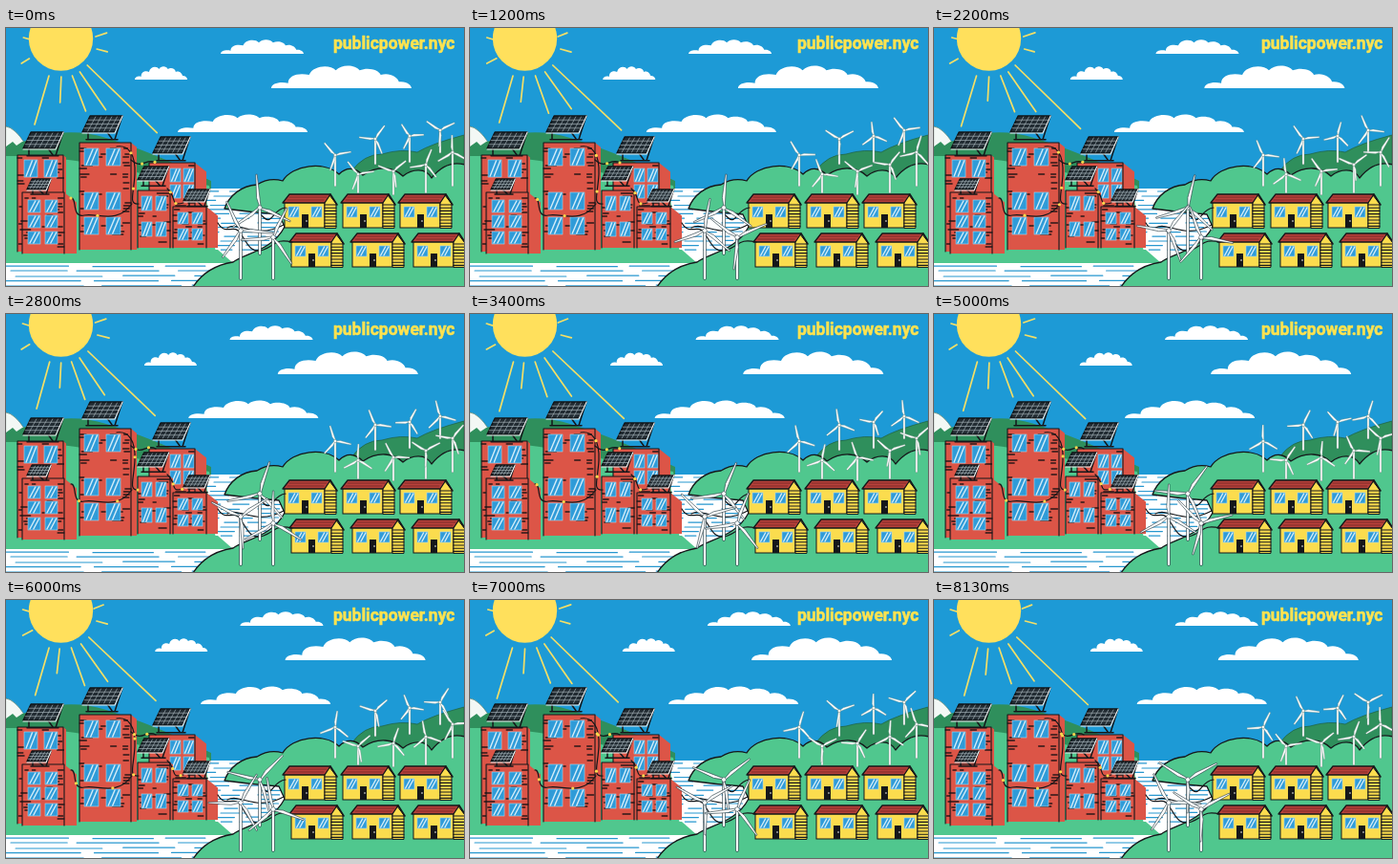
These frames come from a looping animation (480 by 270 pixels, 8.19 s). An HTML page:

```html
<!DOCTYPE html>
<html lang="en">
<head>
<meta charset="utf-8">
<title>Public power</title>
<style>
html, body { margin: 0; width: 100%; height: 100%; overflow: hidden; background: #1d9ad6; }
svg { display: block; width: 100vw; height: 100vh; }
text { font: 700 17.5px Roboto, Arial, sans-serif; }
</style>
</head>
<body>
<svg id="stage" viewBox="0 0 480 270"></svg>
<script>
const LOOP = 8190, STEP = LOOP / 123;
const C = { sky: '#1d9ad6', sun: '#ffe05c', red: '#dc5547', green: '#50c78e', dark: '#2f8f5c',
  ink: '#15171a', house: '#fbdc4e', roof: '#b8403a', water: '#2797cf', glass: '#2f9bd8' };
const stage = document.getElementById('stage');

let seed = 7;
const rnd = (lo, hi) => lo + (hi - lo) * ((seed = (seed * 16807) % 2147483647) / 2147483647);

const path = (d, fill = 'none', stroke = 'none', width = 1) =>
  `<path d="${d}" fill="${fill}" stroke="${stroke}" stroke-width="${width}" stroke-linecap="round" stroke-linejoin="round"/>`;
const rect = (x, y, w, h, fill, extra = '') =>
  `<rect x="${x}" y="${y}" width="${w}" height="${h}" fill="${fill}" ${extra}/>`;

function cloud({ x, y, w, h }) {
  const d = 'M0 1C0 .8 .06 .7 .12 .78C.12 .42 .2 .32 .27 .42C.3 0 .42 -.04 .46 .22' +
    'C.5 -.06 .6 -.03 .63 .22C.69 .06 .77 .2 .78 .42C.84 .3 .9 .5 .91 .72C.97 .68 1 .88 1 1Z';
  return `<g class="cloud"><g transform="translate(${x} ${y}) scale(${w} ${h})">${path(d, '#fff')}</g></g>`;
}

function pane(x, y, w, h) {
  const glint = (from, to) => `M${x + w * from} ${y + h - 1}L${x + w * to} ${y + 1}`;
  return rect(x, y, w, h, C.glass, 'stroke="#a9d9f0" stroke-width=".6"') +
    path(glint(.15, .6) + glint(.45, .9), 'none', '#d3ecf8', 1.4);
}

// The right-hand wall recedes, so its top slopes down
function building(x, y, w, h, { cols, rows, size, side = 3, bricks = 22 }) {
  const right = x + w, front = w - side;
  let out = rect(x, y, front, h, C.red) +
    path(`M${right - side} ${y}L${right} ${y + side * .8}V${y + h}H${right - side}Z`, C.red);
  let marks = '';
  for (let i = 0; i < bricks; i++) {
    const edge = i % 3;
    const bx = edge === 0 ? x + rnd(0, 3) : edge === 1 ? x + front - rnd(6, 9) : x + rnd(3, front - 8);
    marks += `M${bx.toFixed(1)} ${(y + Math.round(rnd(2, h - 4) / 3) * 3).toFixed(1)}h${rnd(3, 7).toFixed(1)}`;
  }
  out += path(marks, 'none', '#2b1718', 1.5);
  for (const wy of rows) for (const wx of cols) out += pane(wx, wy, ...size);
  return out + path(`M${x} ${y + h}V${y}H${right - side}V${y + h}`, 'none', C.ink, 1.1);
}

// x, y: lower left corner of the slanted panel
function panel(x, y, w, h) {
  const lean = h * .48;
  const right = x + w;
  let out = path(`M${right + lean - 1} ${y - h + 2}L${right} ${y + h * .45}M${x + 6} ${y}v${h * .42}` +
    `M${x + 4} ${y + h * .45}H${right + 3}M${right - 8} ${y}l5 ${h * .4}`, 'none', C.ink, 1.5);
  out += path(`M${x} ${y}L${x + lean} ${y - h}H${right + lean}L${right} ${y}Z`, '#222c33', '#101316', 1.5);
  let grid = '';
  for (let i = 1; i < 6; i++) grid += `M${x + w * i / 6} ${y - 1}l${lean} ${-h + 2}`;
  for (let i = 1; i < 4; i++) grid += `M${x + lean * i / 4} ${y - h * i / 4}h${w}`;
  return out + path(grid, 'none', '#a9b6bd', .65) +
    path(`M${x} ${y + 1}H${right}L${right + lean} ${y - h}`, 'none', '#eef3f4', 1.1);
}

function home(x, y) {
  let boards = '';
  for (let i = 0; i < 8; i++) boards += `M43 ${11 + i * 3.2}h12`;
  return `<g transform="translate(${x} ${y})">` +
    rect(1, 8, 42, 27, C.house, `stroke="${C.ink}"`) +
    path('M43 35V8L48 1L55 10V35Z', C.house, C.ink, 1) + path(boards, 'none', C.ink, 1.1) +
    path('M-1 9L6 0H49L43 9Z', C.roof, C.ink, 1.3) +
    path('M4 6H42M6 3H45', 'none', '#6d2524', .8) + path('M49 0L56 11', 'none', C.ink, 1.6) +
    pane(5, 13, 11, 11) + pane(29, 13, 11, 11) +
    rect(19, 21, 7, 14, C.ink) + `<circle cx="24" cy="28" r=".8" fill="#fff"/></g>`;
}

// angle in degrees from upright at the start, speed in degrees per second
const turbine = (x, y, foot, length, angle, speed) => ({ x, y, foot, length, angle, speed });
const farTurbines = [
  turbine(345, 133, 165, 17, -42, 8.2), turbine(387, 116, 142, 17, 35, 22),
  turbine(423, 113, 140, 15, -35, 22), turbine(455, 107, 130, 17, -57, 14.65),
  turbine(369, 153, 172, 17, -40, 14.65), turbine(406, 150, 174, 17, 50, 14.65),
  turbine(440, 143, 172, 17, 20, 14.65), turbine(468, 130, 165, 18, -2, 14.65)
];
const nearTurbines = [
  turbine(266, 188, 236, 35, -6, 8.2), turbine(246, 212, 262, 34, 214, 240 / 8.19),
  turbine(280, 219, 262, 34, 25, 34)
];

function drawTurbine({ x, y, foot, length }) {
  const near = length > 20;
  const wide = near ? 2.3 : 1.5;
  const blade = `M0 0L${-wide} ${-length * .3}L-.6 ${-length}L.8 ${-length}L${wide * .5} 0Z`;
  const edge = near ? '#2c4048' : '#6d8a80';
  const blades = [0, 120, 240].map(a =>
    `<g transform="rotate(${a})">${path(blade, '#fff', edge, near ? .6 : .35)}</g>`).join('');
  return path(`M${x} ${y}V${foot}`, 'none', edge, near ? 3.4 : 2.4) +
    path(`M${x} ${y}V${foot}`, 'none', '#fff', near ? 2.2 : 1.6) +
    `<g class="rotor">${blades}<circle r="${near ? 2.3 : 1.5}" fill="#fff" stroke="${edge}" stroke-width=".5"/></g>`;
}

function ripples(x0, x1, y0, y1, gap) {
  let d = '';
  for (let y = y0; y < y1; y += gap) {
    for (let x = x0 + rnd(-20, 15); x < x1;) {
      const w = rnd(.12, .4) * (x1 - x0);
      d += `M${x.toFixed(1)} ${(y + rnd(-.5, .5)).toFixed(1)}h${w.toFixed(1)}`;
      x += w + rnd(8, 26);
    }
  }
  return path(d, 'none', C.water, 1.2);
}

const clouds = [
  { x: 225, y: 12, w: 87, h: 15, drift: 28 }, { x: 135, y: 40, w: 55, h: 14, drift: 29 },
  { x: 278, y: 39, w: 147, h: 24, drift: 20 }, { x: 180, y: 90, w: 136, h: 19, drift: 33 }
];
// start x, y, end x, y
const rays = [
  [45, 50, 30, 101], [57, 51, 55, 77], [69, 50, 83, 88], [78, 46, 106, 86], [86, 39, 157, 107],
  [95, 22, 106, 25], [93, 9, 104, 5], [18, 10, 25, 12], [17, 37, 26, 32]
];
const wires = [
  'M68 178C75 177 68 199 82 196S116 206 132 184',
  'M116 124C128 122 136 132 135 153S128 185 139 184',
  'M131 138C143 149 147 135 157 141',
  'M169 168C180 178 171 187 186 183'
];

const rightLand = 'M196 271C205 257 219 248 238 245C252 235 279 233 292 208L286 195Q258 193 229 189' +
  'C234 175 247 165 263 164Q276 156 290 160C300 143 334 139 349 153C357 145 366 146 374 154' +
  'C390 143 407 146 416 155C426 147 440 146 446 157C458 142 470 140 481 143V271Z';

stage.innerHTML =
  rect(0, 0, 480, 270, C.sky) +
  '<g id="rays"></g>' +
  `<circle cx="57.5" cy="11" r="33.7" fill="${C.sun}"/>` +
  clouds.map(cloud).join('') +
  path('M0 103Q9 104 20 121L30 142H0Z', '#f3f8f5', '#3b6c58', .6) +
  path('M0 124L7 119L11 123L17 119L36 114Q70 104 105 115T170 139L215 160V190H0Z', C.dark) +
  path('M0 134Q45 133 90 142T213 165L222 232V247H0Z', C.green) +
  path('M208 168H300V246H222Z', '#fff') + ripples(214, 290, 171, 236, 4.7) +
  rect(0, 246, 240, 24, '#fff') + ripples(0, 228, 249.5, 270, 5) +
  path('M0 232H222L238 246H0Z', C.green) +
  path('M362 150Q375 132 394 132Q414 126 431 130Q446 121 480 112V175H362Z', C.dark, '#1f6041', .7) +
  path(rightLand, C.green, C.ink, 1.3) +
  building(150, 141, 60, 60, { cols: [172, 186], rows: [147, 164], size: [11, 14], side: 12 }) +
  building(12, 133, 51, 101, { cols: [19, 40], rows: [138], size: [14, 18], bricks: 30 }) +
  building(17, 172, 57, 64, { cols: [23, 41], rows: [180, 196, 213], size: [13, 13], side: 13, bricks: 26 }) +
  building(77, 120, 60, 112, { cols: [82, 105], rows: [126, 172, 198], size: [15, 18], side: 6, bricks: 54 }) +
  building(138, 170, 37, 60, { cols: [142, 157], rows: [176, 203], size: [11, 15] }) +
  building(175, 187, 47, 43, { cols: [180, 195], rows: [193, 210], size: [11, 12], side: 12 }) +
  panel(18, 126, 34, 17) + panel(80, 109, 34, 17) + panel(154, 131, 31, 17) +
  panel(138, 159, 26, 14) + panel(186, 181, 22, 12) + panel(22, 169, 20, 11) +
  wires.map(d => path(d, 'none', C.ink, 1.2)).join('') +
  '<g id="sparks"></g>' +
  farTurbines.map(drawTurbine).join('') +
  [[291, 174], [352, 174], [412, 174], [298, 215], [362, 215], [426, 215]].map(p => home(...p)).join('') +
  path('M222 204C230 218 239 204 246 215S257 237 270 232S282 220 300 224M232 209C246 202 261 222 291 206' +
    'M266 194C280 211 277 190 293 188', 'none', C.ink, 1.2) +
  nearTurbines.map(drawTurbine).join('') +
  `<text x="470.5" y="22" text-anchor="end" fill="#ffe34f" stroke="#ffe34f" stroke-width=".5">publicpower.nyc</text>`;

const cloudNodes = [...stage.querySelectorAll('.cloud')];
const rotors = [...stage.querySelectorAll('.rotor')];
const turbines = [...farTurbines, ...nearTurbines];
const rayLayer = document.getElementById('rays');
const sparkLayer = document.getElementById('sparks');
const tracks = wires.map(d => {
  const node = document.createElementNS('http://www.w3.org/2000/svg', 'path');
  node.setAttribute('d', d);
  return { node, length: node.getTotalLength() };
});

function rayPath([x1, y1, x2, y2], i, time) {
  const sway = 1.8 * Math.sin(time * 2.6 + i * 1.3);
  const reach = 1 + .04 * Math.sin(time * 3.8 + i * 2);
  return `M${x1 + sway * .5} ${y1}L${x1 + (x2 - x1) * reach + sway} ${y1 + (y2 - y1) * reach}`;
}

function draw(ms) {
  const now = Math.floor((ms % LOOP) / STEP) * STEP;
  const time = now / 1000;
  cloudNodes.forEach((node, i) =>
    node.setAttribute('transform', `translate(${clouds[i].drift * now / LOOP} 0)`));
  rotors.forEach((node, i) => {
    const { x, y, angle, speed } = turbines[i];
    node.setAttribute('transform', `translate(${x} ${y}) rotate(${angle + speed * time})`);
  });
  rayLayer.innerHTML = path(rays.map((ray, i) => rayPath(ray, i, time)).join(''), 'none', '#f4df66', 1.7);
  sparkLayer.innerHTML = tracks.map(({ node, length }, i) => [0, .5].map(offset => {
    const p = node.getPointAtLength(length * ((time * .45 + offset + i * .23) % 1));
    return `<circle cx="${p.x}" cy="${p.y}" r="1.6" fill="#ffd84d"/>`;
  }).join('')).join('');
}

const start = performance.now();
function tick() {
  draw(performance.now() - start);
  requestAnimationFrame(tick);
}
draw(0);
requestAnimationFrame(tick);
</script>
</body>
</html>
```
